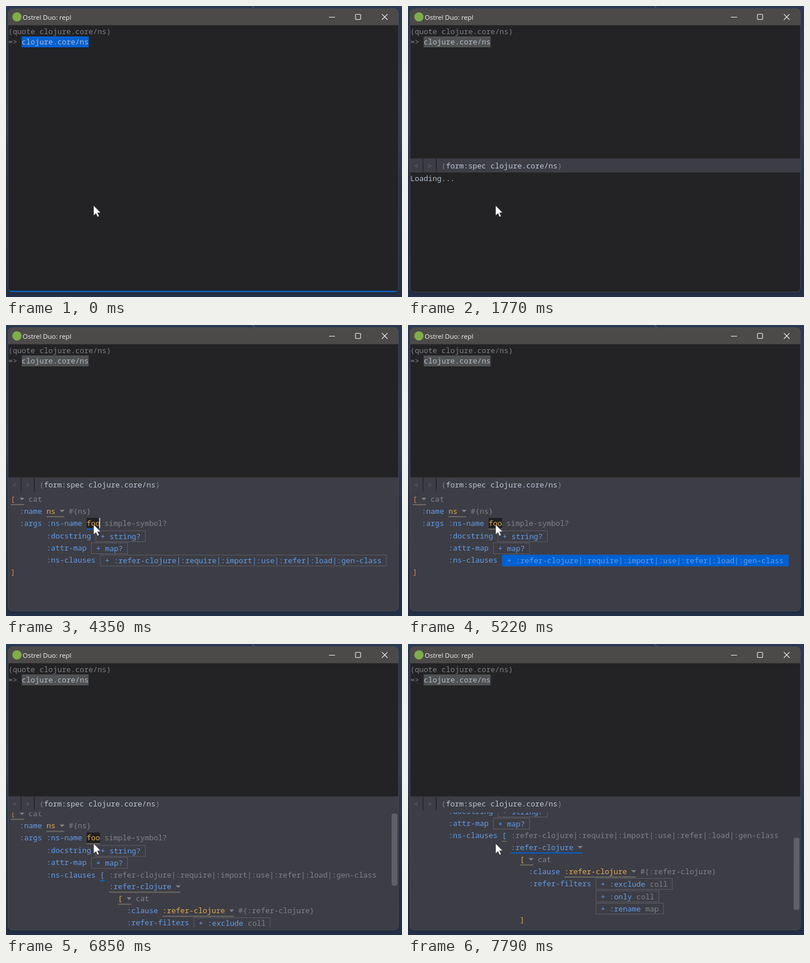
An HTML page for the animation above (8 s loop, 689x507 px).

```html
<!DOCTYPE html>
<html lang="en">
<head>
<meta charset="utf-8">
<title>Form view</title>
<style>
  html, body { margin: 0; width: 100%; height: 100%; overflow: hidden; background: #27364f; }
  svg { display: block; width: 689px; height: 507px; }
  text { white-space: pre; font: 12.94px "Noto Sans Mono", "DejaVu Sans Mono", monospace; }
  .title { font: 11.5px "Open Sans", "Noto Sans", sans-serif; fill: #f4f4f4; }
</style>
</head>
<body>
<svg id="stage" viewBox="0 0 689 507" xmlns="http://www.w3.org/2000/svg">
  <defs>
    <linearGradient id="desk" x2="0" y2="1">
      <stop offset="0" stop-color="#2b3a55"/>
      <stop offset=".42" stop-color="#35435c"/>
      <stop offset=".6" stop-color="#28374f"/>
      <stop offset="1" stop-color="#233047"/>
    </linearGradient>
    <clipPath id="win"><rect x="3.5" y="4.5" width="679.5" height="494" rx="7"/></clipPath>
    <clipPath id="view"><rect x="4" y="293.5" width="679" height="200.5"/></clipPath>
    <filter id="shade" x="-5%" y="-5%" width="110%" height="112%">
      <feDropShadow dx="0" dy="1" stdDeviation="2.5" flood-opacity=".6"/>
    </filter>
  </defs>
  <rect width="689" height="507" fill="url(#desk)"/>
  <path d="M428 0l5 4" stroke="#66758b" fill="none"/>
  <rect x="3.5" y="4.5" width="679.5" height="494" rx="7" filter="url(#shade)" opacity=".5"/>
  <g clip-path="url(#win)">
    <rect x="3" y="4" width="681" height="495" fill="#232325"/>
    <rect x="3" y="4" width="681" height="29.5" fill="#4c4a49"/>
    <g id="content"></g>
  </g>
  <rect x="3.5" y="4.5" width="679.5" height="494" rx="7" fill="none" stroke="#464a53"/>
  <circle cx="19" cy="19" r="8" fill="#7fae4b"/>
  <text class="title" x="29" y="23.5">Ostrel Duo: repl</text>
  <g fill="none" stroke="#f2f2f2" stroke-width="1.1">
    <path d="M562 19.5h10.5M654 14.2l9.8 9.8M663.8 14.2l-9.8 9.8"/>
    <rect x="608" y="14.5" width="9" height="9" rx="1.3"/>
  </g>
  <g id="overlay"></g>
  <path d="M152.3 347.3v18l4.200-3.800 2.700 6 2.900-1.300-2.700-5.900h5.300z" fill="#fff" stroke="#26262a" stroke-width=".7"/>
</svg>
<script>
const LOOP = 8000, ADV = 7.765, LEFT = 8.3, PAD = 8.6;
const BLUE = '#0060d2', PANEL = '#3d3d46', DARK = '#202022', LINE = '#6d6860';
const GREY = '#828287', KEY = '#629ee8', GOLD = '#e2ad4c', RUST = '#d88250', RED = '#e25a56', LIGHT = '#b3bdca';
const SPEC = ':refer-clojure|:require|:import|:use|:refer|:load|:gen-class';
const timed = [];

function add(parent, tag, attrs, str) {
  const el = document.createElementNS('http://www.w3.org/2000/svg', tag);
  for (const k in attrs) el.setAttribute(k, attrs[k]);
  if (str) el.textContent = str;
  return parent.appendChild(el);
}
// show an element only from a to b
function during(el, a, b = LOOP) {
  timed.push({ el, a, b });
  return el;
}
const col = c => LEFT + c * ADV;
const layer = (parent, a, b) => during(add(parent, 'g', {}), a, b);
const rect = (p, x, y, width, height, fill) => add(p, 'rect', { x, y, width, height, fill });
const write = (p, x, y, str, fill) => add(p, 'text', { x, y, fill }, str);
const put = (p, c, y, str, fill) => write(p, col(c), y, str, fill);
const arrow = (p, c, y) =>
  add(p, 'path', { d: `M${col(c) - .3} ${y - 6.5}h8.4l-4.2 4.5z`, fill: GREY });

function underline(p, c, len, y, a, b) {
  rect(p, col(c), y + 4.5, len * ADV, 2, LINE);
  during(rect(p, col(c), y + 4.5, len * ADV, 2, BLUE), a, b);
}
// button text sits one pixel below its row
function button(p, c, y, label, note, a = -1, b = -1) {
  const width = (label.length + note.length) * ADV + 2 * PAD;
  add(p, 'rect', { x: col(c) + .5, y: y - 13.5, width: width - 1, height: 19, fill: 'none', stroke: '#5d5d65' });
  during(rect(p, col(c), y - 14, width, 20, BLUE), a, b);
  write(p, col(c) + PAD, y + 1, label, KEY);
  if (note) write(p, col(c) + PAD + label.length * ADV, y + 1, note, GREY);
}

const content = document.getElementById('content');
const overlay = document.getElementById('overlay');

// output pane
write(content, 4, 48.5, '(quote clojure.core/ns)', GREY);
write(content, 4, 67, '=>', GREY);
rect(content, 27.3, 53, 15 * ADV, 19, '#505153');
const picked = layer(content, 0, 1770);
rect(picked, 27.3, 53, 15 * ADV, 19, BLUE);
rect(picked, 3, 496, 680, 2, BLUE);
write(content, 27.3, 67, 'clojure.core/ns', LIGHT);

// action popup
const popup = layer(overlay, 610, 1770);
add(popup, 'path', { d: 'M4 79h76l6-6 6 6h201v151h-289z', fill: PANEL, stroke: '#54545c', filter: 'url(#shade)' });
rect(popup, 4, 115, 289, 1, '#54545c');
during(rect(popup, 4, 115, 289, 2, BLUE), 610, 1220);
during(rect(popup, 11, 92, 1.5, 19, '#eee'), 610, 1070);
during(rect(popup, 4, 122.5, 289, 26.5, BLUE), 1220, 1390);
during(rect(popup, 4, 149, 289, 26.5, BLUE), 1390, 1770);
['doc', 'form:spec', 'source', 'view:ns'].forEach((s, i) => write(popup, 12, 140 + i * 26.5, s, LIGHT));

// result pane
const HEAD = 58.2;
const pane = layer(content, 1770);
rect(pane, 3, 265.5, 680, 24.5, PANEL);
during(rect(pane, 3, 289, 680, 210, PANEL), 1940);
rect(pane, 25.5, 266, 1.3, 24, '#222224');
rect(pane, 48.5, 266, 1.3, 24, '#222224');
write(pane, 11, 282.5, '<', '#65656c');
write(pane, 34, 282.5, '>', '#65656c');
write(pane, HEAD, 282.5, '(', GREY);
write(pane, HEAD + ADV, 282.5, 'form:spec clojure.core/ns', '#c0c9d5');
write(pane, HEAD + 26 * ADV, 282.5, ')', GREY);
during(write(pane, 4, 304.5, 'Loading...', LIGHT), 1770, 1940);

// form
const view = add(layer(pane, 1940), 'g', { 'clip-path': 'url(#view)' });
const form = add(view, 'g', {});
const missing = layer(form, 1940, 3970);

underline(form, 0, 3, 307.5, 1940, 2870);
put(form, 0, 307.5, '[', RUST);
arrow(form, 2, 307.5);
put(form, 4, 307.5, 'cat', GREY);
put(missing, 8, 307.5, '-', GREY);
put(missing, 10, 307.5, 'required', RED);

underline(form, 8, 4, 328.5, 2870, 3190);
put(form, 2, 328.5, ':name', KEY);
put(form, 8, 328.5, 'ns', GOLD);
arrow(form, 11, 328.5);
put(form, 13, 328.5, '#{ns}', GREY);

put(form, 2, 350, ':args', KEY);
put(form, 8, 350, ':ns-name', KEY);
[[2, 1940, 4350], [3, 4350, LOOP]].forEach(([len, a, b]) => {
  const g = layer(form, a, b);
  rect(g, col(17), 336, len * ADV, 19, DARK);
  underline(g, 17, len, 350, 3190, 4670);
  put(g, 18 + len, 350, 'simple-symbol?', GREY);
});
put(missing, 35, 350, '-', GREY);
put(missing, 37, 350, 'required', RED);

// typing, with the caret after the last letter
const caret = (x, a, b) => during(rect(form, x, 336, 1.5, 18, '#eee'), a, b);
const typed = [3970, 4120, 4350, 4670];
caret(col(17), 3190, 3650);
[...'foo'].forEach((ch, i) => {
  during(put(form, 17 + i, 350, ch, GOLD), typed[i]);
  caret(col(18 + i) - 1.5, typed[i], typed[i + 1]);
});

put(form, 8, 371.5, ':docstring', KEY);
button(form, 19, 372, '+ string?', '', 4670, 4900);
put(form, 8, 393, ':attr-map', KEY);
button(form, 18, 393, '+ map?', '', 4900, 5220);
put(form, 8, 414.3, ':ns-clauses', KEY);

const folded = layer(form, 1940, 6070);
button(folded, 20, 414.3, '+ ' + SPEC, '', 5220, 6070);
put(folded, 0, 434.7, ']', RUST);

const open = layer(form, 6070);
underline(open, 20, 1, 414.3, 6070, 7790);
put(open, 20, 414.3, '[', KEY);
put(open, 22, 414.3, SPEC, GREY);
underline(open, 22, 16, 434.5, 7790);
put(open, 22, 434.5, ':refer-clojure', KEY);
arrow(open, 37, 434.5);
underline(open, 24, 3, 455.5, -1, -1);
put(open, 24, 455.5, '[', GOLD);
arrow(open, 26, 455.5);
put(open, 28, 455.5, 'cat', GREY);
underline(open, 34, 16, 476.5, -1, -1);
put(open, 26, 476.5, ':clause', KEY);
put(open, 34, 476.5, ':refer-clojure', GOLD);
arrow(open, 49, 476.5);
put(open, 51, 476.5, '#{:refer-clojure}', GREY);
put(open, 26, 498, ':refer-filters', KEY);
button(open, 41, 498, '+ :exclude', ' coll');
button(open, 41, 519.5, '+ :only', ' coll');
button(open, 41, 541, '+ :rename', ' map');
put(open, 24, 561.2, ']', GOLD);

const thumb = during(add(pane, 'rect', { x: 671, y: 290.5, width: 10, height: 126, rx: 3.5, fill: '#5f5f67' }), 6070);

function draw() {
  const t = performance.now() % LOOP;
  for (const { el, a, b } of timed) el.style.display = t >= a && t < b ? '' : 'none';
  const steps = t < 6850 ? 0 : Math.min(10, Math.floor((t - 6850) * 9 / 710) + 1);
  const scroll = steps * 7.6;
  form.setAttribute('transform', `translate(0 ${-scroll})`);
  thumb.setAttribute('y', 290.5 + scroll * .62);
  requestAnimationFrame(draw);
}
draw();
</script>
</body>
</html>
```
